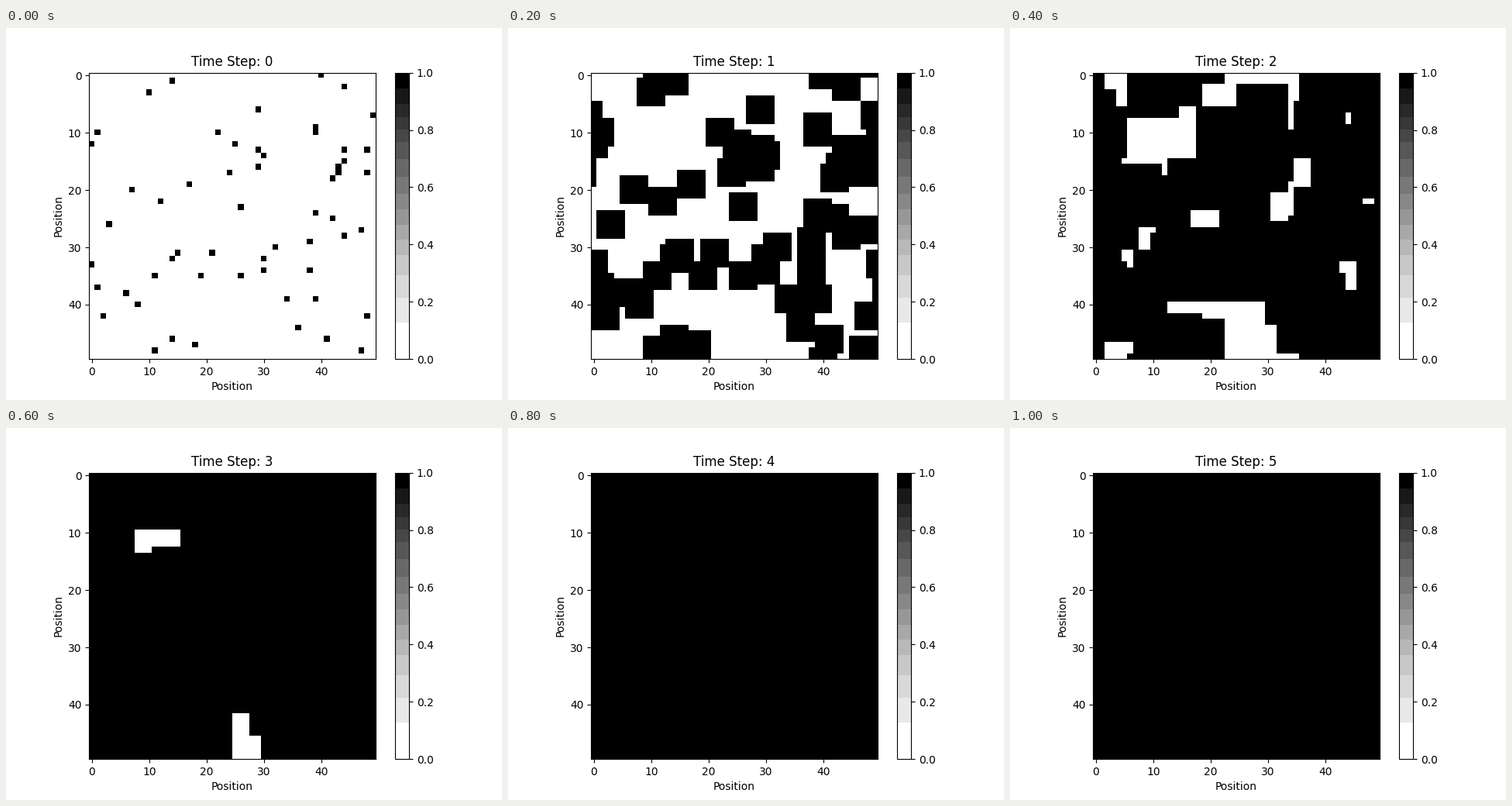
A matplotlib script that plays this animation: 640 px wide and 480 px high, repeating every 1200 ms.

```python
import matplotlib.pyplot as plt
import numpy as np
from matplotlib.animation import FuncAnimation
from matplotlib.colors import ListedColormap

SIZE, REACH, STEPS = 50, 2, 6

# Starting cells as (column, row)
SEEDS = [
    (40, 0), (14, 1), (44, 2), (10, 3), (29, 6), (49, 7), (39, 9), (39, 10),
    (1, 10), (22, 10), (0, 12), (25, 12), (29, 13), (44, 13), (48, 13),
    (30, 14), (44, 15), (29, 16), (43, 16), (24, 17), (43, 17), (48, 17),
    (42, 18), (17, 19), (7, 20), (12, 22), (26, 23), (39, 24), (42, 25),
    (3, 26), (47, 27), (44, 28), (38, 29), (32, 30), (15, 31), (21, 31),
    (14, 32), (30, 32), (0, 33), (30, 34), (38, 34), (11, 35), (19, 35),
    (26, 35), (1, 37), (6, 38), (34, 39), (39, 39), (8, 40), (2, 42),
    (48, 42), (36, 44), (14, 46), (41, 46), (18, 47), (11, 48), (47, 48),
]


def stepped_greys(width=16):
    """Greys reduced to flat bands, with pure black and white at the ends."""
    levels = (plt.get_cmap("Greys")(np.arange(256))[:, 0] * 255).round()
    bands = levels // width
    tones = np.array([levels[bands == band].mean() for band in bands])
    tones[bands == 0] = 0
    tones[bands == bands.max()] = 255
    return ListedColormap(np.repeat(tones[:, None] / 255, 3, axis=1))


def grid_at(step):
    """Every cell fills its square neighbourhood each step, wrapping at edges."""
    grid = np.zeros((SIZE, SIZE))
    reach = min(step * REACH, SIZE // 2)
    offsets = np.arange(-reach, reach + 1)
    for col, row in SEEDS:
        grid[np.ix_((row + offsets) % SIZE, (col + offsets) % SIZE)] = 1
    return grid


fig, ax = plt.subplots(figsize=(6.4, 4.8), dpi=100)
image = ax.imshow(grid_at(0), cmap=stepped_greys(), vmin=0, vmax=1)
fig.colorbar(image, ax=ax)
ax.set(xlabel="Position", ylabel="Position")
title = ax.set_title("Time Step: 0")


def update(step):
    image.set_data(grid_at(step))
    title.set_text(f"Time Step: {step}")
    return image, title


anim = FuncAnimation(fig, update, frames=STEPS, interval=200, repeat=True,
                     repeat_delay=0, blit=False)
plt.show()
```
